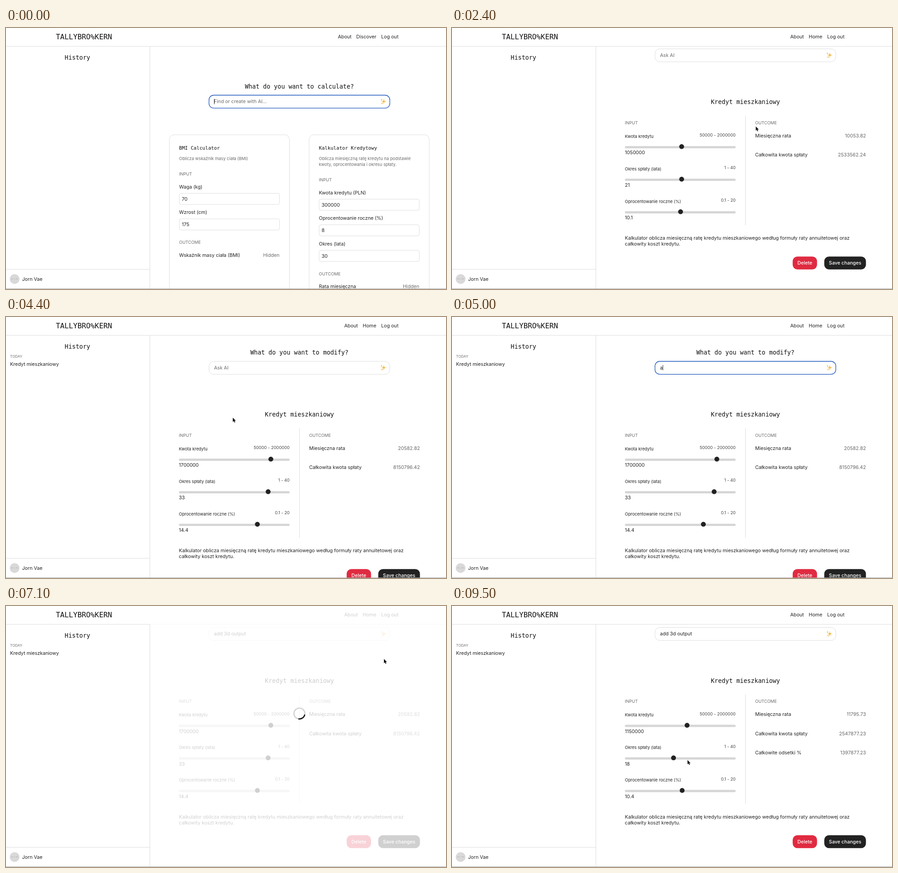
Animation of 971 by 577 pixels, one loop 9.6 s. Source, as an HTML page with a canvas:

```html
<!DOCTYPE html>
<html lang="en">
<head>
<meta charset="utf-8">
<title>Calculator builder</title>
<style>
html, body { margin: 0; width: 100%; height: 100%; overflow: hidden; background: #fff; }
canvas { display: block; width: 971px; height: 577px; }
</style>
</head>
<body>
<canvas id="stage" width="971" height="577"></canvas>
<script>
const ctx = document.getElementById('stage').getContext('2d');
const LOOP = 9600, STEP = 100;
const SANS = 'Inter, "Liberation Sans", sans-serif';
const SYSTEM = '"Liberation Sans", sans-serif';
const MONO = '"DejaVu Sans Mono", monospace';
const INK = '#222', GRAY = '#6b6b6b', LINE = '#dedede', BLUE = '#1a54bd', GOLD = '#f2b63c';
const BODY = 10.67, SMALL = 9.33;
const MID = 647.5, ROW = 72;

// Moments of the story, in ms.
const FIND = 1300, OPEN = 2100, SAVE = 4100, EDIT = 4700, ASK = 6500, REBUILT = 7800;

const within = (t, from, to) => t >= from && t < to;
const ramp = (t, from, span) => Math.min(1, Math.max(0, (t - from) / span));
const ease = u => u * u * (3 - 2 * u);

// Text is placed by the middle of its capitals.
function text(s, x, y, { size = BODY, color = INK, align = 'left', font = SANS, weight = 400 } = {}) {
  ctx.font = `${weight} ${size}px ${font}`;
  ctx.textAlign = align;
  ctx.fillStyle = color;
  ctx.fillText(s, x, y + size * 0.36);
}
const heading = (s, x, y, size = 13.33, align = 'center') =>
  text(s, x, y, { size, align, font: MONO, color: '#111' });
const caption = (s, x, y) => text(s, x, y, { size: SMALL, color: GRAY });

function rect(x, y, w, h, color) {
  ctx.fillStyle = color;
  ctx.fillRect(x, y, w, h);
}

function box(x, y, w, h, r, fill, stroke, width = 1) {
  ctx.beginPath();
  ctx.roundRect(x, y, w, h, r);
  if (fill) { ctx.fillStyle = fill; ctx.fill(); }
  if (stroke) { ctx.strokeStyle = stroke; ctx.lineWidth = width; ctx.stroke(); }
}

function disc(x, y, r, color) {
  ctx.beginPath();
  ctx.arc(x, y, r, 0, Math.PI * 2);
  ctx.fillStyle = color;
  ctx.fill();
}

function star(x, y, r, color) {
  ctx.beginPath();
  ctx.moveTo(x, y - r);
  for (let i = 1; i <= 4; i++) {
    const a = i * Math.PI / 2;
    ctx.quadraticCurveTo(x, y, x + r * Math.sin(a), y - r * Math.cos(a));
  }
  ctx.fillStyle = ctx.strokeStyle = color;
  ctx.lineWidth = 0.5;
  ctx.fill();
  ctx.stroke();
}

function promptBox(y, value, hint, { focus, caret, hover, filled }) {
  if (hover) box(448, y - 18, 401, 31, 11, '#fad9dc');
  box(448, y - 14, 399, 28.7, 10.5, filled ? '#e6f5fe' : '#fff', focus ? BLUE : LINE, focus ? 1.3 : 1);
  text(value || hint, 459, y, { color: value ? INK : GRAY, font: filled ? SYSTEM : SANS });
  if (caret) rect(459 + (value ? ctx.measureText(value).width : 0), y - 6, 0.9, 12, INK);
  const small = hover ? '#e8574f' : GOLD;
  star(833.7, y, 5, GOLD);
  star(828.8, y - 3.8, 1.7, small);
  star(830, y + 4.2, 1.7, small);
}

function card(x, title, about, fields, outcome) {
  box(x + 0.5, 236, 265, 420, 10.5, '#fff', LINE);
  const left = x + 22, right = x + 243.5;
  heading(title, left, 265, BODY, 'left');
  about.forEach((s, i) => caption(s, left, 289 + i * 13));
  const top = 309.3 + about.length * 13;
  caption('INPUT', left, top);
  fields.forEach(([label, value], i) => {
    const y = top + 28.5 + i * 56.5;
    text(label, left, y);
    box(left + 0.5, y + 14.6, 221, 24.7, 4, '#fff', LINE);
    text(value, left + 6, y + 27);
  });
  const end = top + fields.length * 56.5 + 38.5;
  caption('OUTCOME', left, end);
  text(outcome, left, end + 28.3);
  text('Hidden', right, end + 28.3, { color: GRAY, align: 'right' });
}

const bmiCard = x => card(x, 'BMI Calculator', ['Oblicza wskaźnik masy ciała (BMI)'],
  [['Waga (kg)', '70'], ['Wzrost (cm)', '175']], 'Wskaźnik masy ciała (BMI)');
const loanCard = x => card(x, 'Kalkulator Kredytowy',
  ['Oblicza miesięczną ratę kredytu na podstawie', 'kwoty, oprocentowania i okresu spłaty.'],
  [['Kwota kredytu (PLN)', '300000'], ['Oprocentowanie roczne (%)', '8'], ['Okres (lata)', '30']],
  'Rata miesięczna');

function home(t) {
  const query = 'kredyt mieszkaniowy'.slice(0, t / STEP * 2);
  const typing = t < FIND - 200;
  heading('What do you want to calculate?', MID, 129);
  promptBox(162.5, query, 'Find or create with AI...',
    { focus: typing, caret: typing, hover: within(t, FIND, FIND + 300), filled: !typing });
  if (query.length < 2) {
    bmiCard(360);
    loanCard(668.5);
  } else if (query.length < 8) {
    loanCard(360);
  }
}

const SLIDERS = [
  { label: 'Kwota kredytu', min: 50000, max: 2000000, step: 50000 },
  { label: 'Okres spłaty (lata)', min: 1, max: 40, step: 1 },
  { label: 'Oprocentowanie roczne (%)', min: 0.1, max: 20, step: 0.1 }
];
const DRAG = 200;
const drags = [
  { at: 2700, row: 0, to: 700000 }, { at: 3300, row: 1, to: 33 },
  { at: 3550, row: 2, to: 14.4 }, { at: 3800, row: 0, to: 1700000 },
  { at: 8200, row: 0, to: 1150000 }, { at: 8600, row: 2, to: 10.4 }, { at: 9100, row: 1, to: 18 }
];

// Sliders start in the middle, and do so again once the calculator is rebuilt.
function sliderValue(row, t) {
  const { min, max, step } = SLIDERS[row];
  let value = (min + max) / 2;
  for (const d of drags) {
    const current = t < REBUILT || d.at >= REBUILT;
    if (d.row === row && current) value += (d.to - value) * ease(ramp(t, d.at, DRAG));
  }
  return Math.round(Math.round(value / step) * step * 10) / 10;
}

function knobX(row, value) {
  const { min, max } = SLIDERS[row];
  return 387.3 + 233 * (value - min) / (max - min);
}

function slider(row, value) {
  const { label, min, max } = SLIDERS[row], y = 291.5 + row * ROW;
  text(label, 381.5, y, { size: SMALL });
  text(`${min} - ${max}`, 626, y - 2.5, { size: SMALL, color: '#444', align: 'right' });
  box(381.5, y + 21.5, 244.5, 5, 2.5, '#d6d6d6');
  disc(knobX(row, value), y + 22.7, 5.4, INK);
  text(String(value), 381.5, y + 36);
}

function button(label, x, w, y, color) {
  box(x, y, w, 28.6, 10.5, color);
  text(label, x + w / 2, y + 14.4, { color: '#fff', align: 'center', weight: 500 });
}

function calculator(t, scroll) {
  ctx.save();
  ctx.translate(0, -scroll);

  const pause = t < 6000 ? 0 : STEP;
  const typed = Math.max(0, (t - pause - 4900) / STEP);
  const focus = within(t, EDIT, ASK + 100);
  heading('What do you want to modify?', MID, 78);
  promptBox(112, 'add 3d output'.slice(0, typed), 'Ask AI',
    { focus, caret: focus, hover: within(t, ASK, ASK + 200) });

  heading('Kredyt mieszkaniowy', MID, 215.3);
  caption('INPUT', 381.5, 261.5);
  caption('OUTCOME', 669, 261.5);
  rect(647, 246, 1, 242, LINE);

  const values = SLIDERS.map((_, row) => sliderValue(row, t));
  values.forEach((value, row) => slider(row, value));

  const [amount, years, percent] = values;
  const rate = percent / 1200, months = years * 12;
  const payment = amount * rate / (1 - Math.pow(1 + rate, -months));
  const total = payment * months;
  const results = [['Miesięczna rata', payment], ['Całkowita kwota spłaty', total]];
  if (t >= REBUILT) results.push(['Całkowite odsetki %', total - amount]);
  results.forEach(([label, v], i) => {
    const y = 290 + i * 42.3;
    text(label, 669, y);
    text(v.toFixed(2), 913.5, y, { color: '#666', align: 'right' });
  });

  text('Kalkulator oblicza miesięczną ratę kredytu mieszkaniowego według formuły raty annuitetowej oraz', 381.5, 516.3);
  text('całkowity koszt kredytu.', 381.5, 529.3);
  button('Delete', 751.8, 53.8, 557.2, '#e02b41');
  button('Save changes', 821.5, 92, 557.2, INK);
  ctx.restore();
}

function header(onHome) {
  rect(0, 0, 971, 40, '#fff');
  rect(0, 40, 971, 1, LINE);
  heading('TALLYBRO%KERN', 110, 19, 15.85, 'left');
  const links = onHome ? [['About', 732.5], ['Discover', 773]] : [['About', 746.5], ['Home', 787.3]];
  links.forEach(([s, x]) => text(s, x, 19));
  text('Log out', 828, 19);
}

function sidebar(saved) {
  rect(0, 41, 317, 536, '#fff');
  rect(317, 41, 1, 536, LINE);
  heading('History', 157.7, 65.5);
  if (saved) {
    text('TODAY', 9, 87, { size: 8, color: GRAY });
    text('Kredyt mieszkaniowy', 9, 103.7);
  }
  rect(0, 533, 317, 1, LINE);
  disc(19, 555, 10.7, '#d9d9d9');
  text('60 × 60', 19, 555, { size: 4, color: '#aaa', align: 'center' });
  text('Jorn Vae', 35.5, 555.5);
}

function loader(t, scroll) {
  rect(318, 0, 653, 577, 'rgba(255,255,255,0.79)');
  const ring = (from, to, color) => {
    ctx.beginPath();
    ctx.arc(MID, 288.2 - scroll, 12, from, to);
    ctx.strokeStyle = color;
    ctx.lineWidth = 2.6;
    ctx.stroke();
  };
  const turn = (t - 7100) / 1000 * Math.PI * 2 + 0.98;
  ring(0, Math.PI * 2, '#d2d2d2');
  ring(turn - Math.PI / 4, turn + Math.PI / 4, '#111');
}

const scrollAt = t => 52 * (ramp(t, OPEN + 100, 200) - ramp(t, SAVE, 100)) + 50.5 * ramp(t, ASK + 200, 300);

// The pointer rests at clicks and follows the knobs it drags.
const stop = (at, x, y) => ({ at, x, y });
const dragStops = drags.flatMap(({ at, row, to }) => {
  const y = 320 + row * ROW - scrollAt(at);
  return [stop(at, knobX(row, sliderValue(row, at)), y), stop(at + DRAG, knobX(row, to), y)];
});
const stops = [
  stop(1000, MID, 290), stop(FIND, 834, 167), stop(OPEN, 834, 167),
  stop(SAVE, 867, 519), stop(4400, 500.5, 222.5), stop(EDIT, 560, 113),
  stop(6200, 700, 180), stop(ASK, 834, 117), stop(REBUILT, 834, 117),
  stop(9500, 519.7, 340.5), ...dragStops
].sort((a, b) => a.at - b.at);

const ARROW = new Path2D('M0 0V9.6L2.2 7.6L3.7 11L5.3 10.3L3.9 7.1L6.7 6.9Z');
const HAND = new Path2D('M-1.2 1Q0 -.7 1.2 1V4.5Q3 4 3.6 5Q5.6 4.8 6.2 6.4V9Q6 11.5 4.9 12.5H-.3Q-1.4 10.6 -3.7 8Q-3.5 6 -1.2 7.6Z');

function pointer(t) {
  if (t < 1100 || within(t, EDIT + 200, 6300)) return;
  const from = stops.findLast(s => s.at <= t);
  const to = stops.find(s => s.at > t) ?? from;
  const u = ease(ramp(t, from.at, to.at - from.at || 1));
  const hand = drags.some(d => within(t, d.at - 100, d.at + DRAG + 100))
    || [FIND, SAVE, ASK].some(at => within(t, at, at + 300));
  ctx.save();
  ctx.translate(from.x + (to.x - from.x) * u, from.y + (to.y - from.y) * u);
  ctx.lineJoin = 'round';
  ctx.lineWidth = 1;
  ctx.strokeStyle = hand ? INK : '#fff';
  ctx.fillStyle = hand ? '#fff' : '#111';
  const shape = hand ? HAND : ARROW;
  if (hand) ctx.fill(shape);
  ctx.stroke(shape);
  if (!hand) ctx.fill(shape);
  ctx.restore();
}

function draw(now) {
  const t = Math.floor((now % LOOP) / STEP) * STEP;
  const scroll = scrollAt(t), onHome = t < OPEN;
  rect(0, 0, 971, 577, '#fff');
  if (onHome) home(t);
  else calculator(t, scroll);
  header(onHome);
  sidebar(t > SAVE);
  if (within(t, FIND + 300, OPEN) || within(t, ASK + 200, REBUILT)) loader(t, scroll);
  pointer(t);
  rect(0, 576, 971, 1, '#a3a3a3');
}

let start;
function tick(now) {
  start ??= now;
  draw(now - start);
  requestAnimationFrame(tick);
}
draw(0);
requestAnimationFrame(tick);
</script>
</body>
</html>
```
